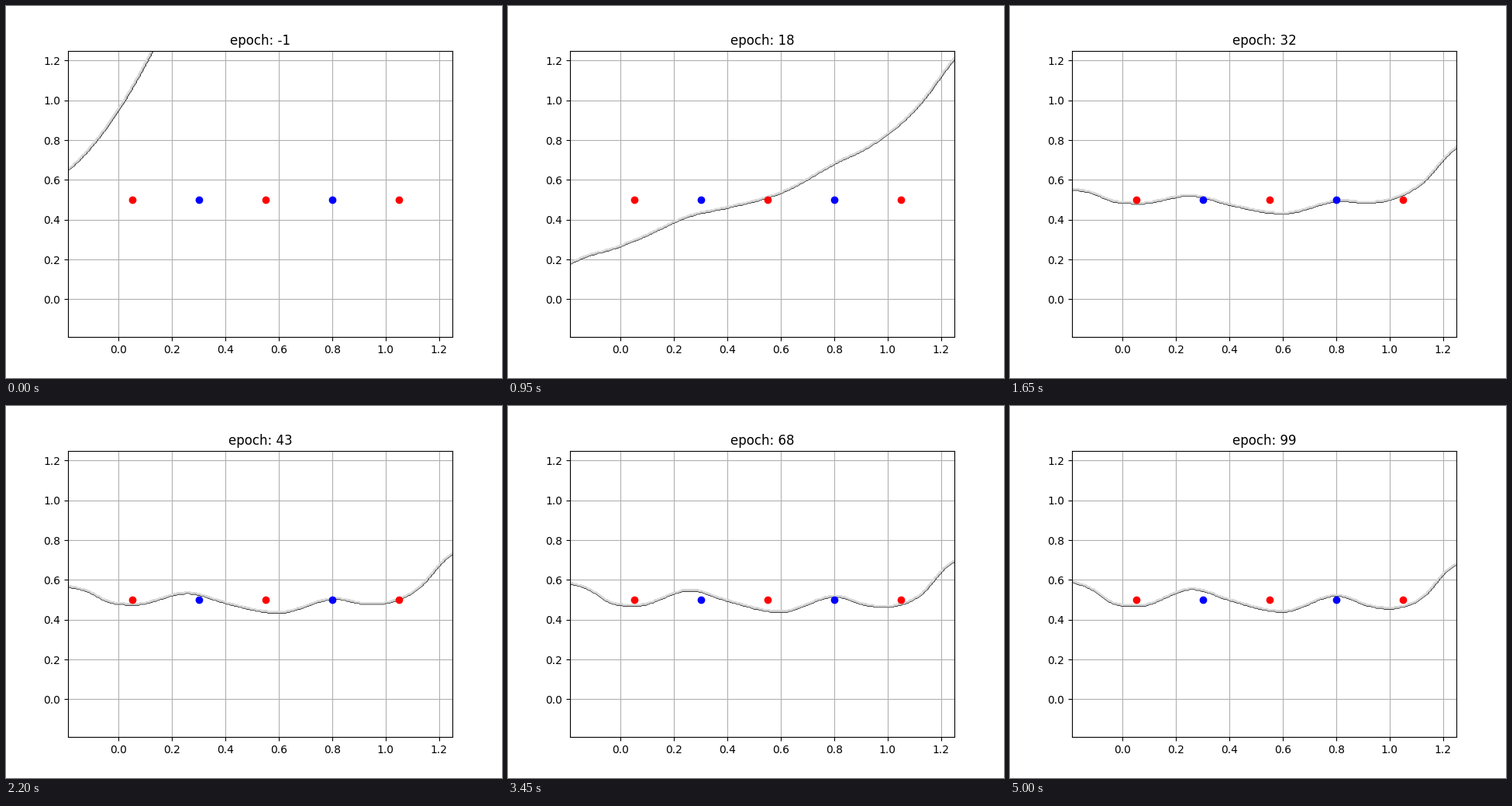
A matplotlib script for the animation above (5050 ms loop, 640 by 480 pixels).

```python
import numpy as np
import matplotlib.pyplot as plt
from matplotlib.animation import FuncAnimation

FRAMES, INTERVAL = 101, 50
LOW, HIGH = -0.19, 1.25
DECAY, ONSET = 0.04, 9  # how fast, and from which epoch, the wave is learnt

# Key points of the wave that the boundary settles into
WAVE_X = np.array([-.2, -.12, -.04, .06, .27, .4, .6, .82, .92, 1.02, 1.12, 1.22, 1.3])
WAVE_Y = np.array([.6, .56, .487, .47, .558, .503, .444, .523, .472, .457, .505, .648, .705])

# Early cubic trend: heights at four x positions for each key epoch
TREND_X = np.array([-.2, .3, .8, 1.3])
EPOCHS = np.array([-1, 10, 18, 32])
TRENDS = np.array([[.64, 1.76, 3.65, 5.7],
                   [.085, .645, 1.33, 2.08],
                   [-.01, .385, .75, 1.56],
                   [.49, .46, .45, 1.0]])


def hermite(t, times, values, slopes):
    """Cubic through values (first axis follows times)."""
    i = np.clip(np.searchsorted(times, t, side="right") - 1, 0, len(times) - 2)
    h = times[i + 1] - times[i]
    u = (t - times[i]) / h
    return ((1 + 2 * u) * (1 - u) ** 2 * values[i]
            + u * (1 - u) ** 2 * h * slopes[i]
            + u * u * (3 - 2 * u) * values[i + 1]
            + u * u * (u - 1) * h * slopes[i + 1])


axis = np.linspace(LOW, HIGH, 289)
X, Y = np.meshgrid(axis, axis)
wave = hermite(axis, WAVE_X, WAVE_Y, np.gradient(WAVE_Y, WAVE_X))
speeds = np.gradient(TRENDS, EPOCHS, axis=0)
speeds[-1] = 0


def boundary(epoch):
    heights = hermite(min(epoch, EPOCHS[-1]), EPOCHS, TRENDS, speeds)
    trend = np.polyval(np.polyfit(TREND_X, heights, 3), axis)
    left = min(1, np.exp(-DECAY * (epoch - ONSET)))
    return wave + left * (trend - wave)


fig, ax = plt.subplots(figsize=(6.4, 4.8), dpi=100)


def draw(frame):
    epoch = frame - 1
    ax.clear()
    ax.contour(X, Y, (Y > boundary(epoch)).astype(float), cmap="gray")
    for k in range(5):
        ax.plot(0.05 + 0.25 * k, 0.5, "o", color="blue" if k % 2 else "red")
    ax.set(xlim=(LOW, HIGH), ylim=(LOW, HIGH))
    ax.set_title(f"epoch: {epoch}", pad=5.25)
    ax.grid(True)
    return ()


anim = FuncAnimation(fig, draw, frames=FRAMES, init_func=lambda: (),
                     interval=INTERVAL, repeat=True, repeat_delay=0)
plt.show()
```
